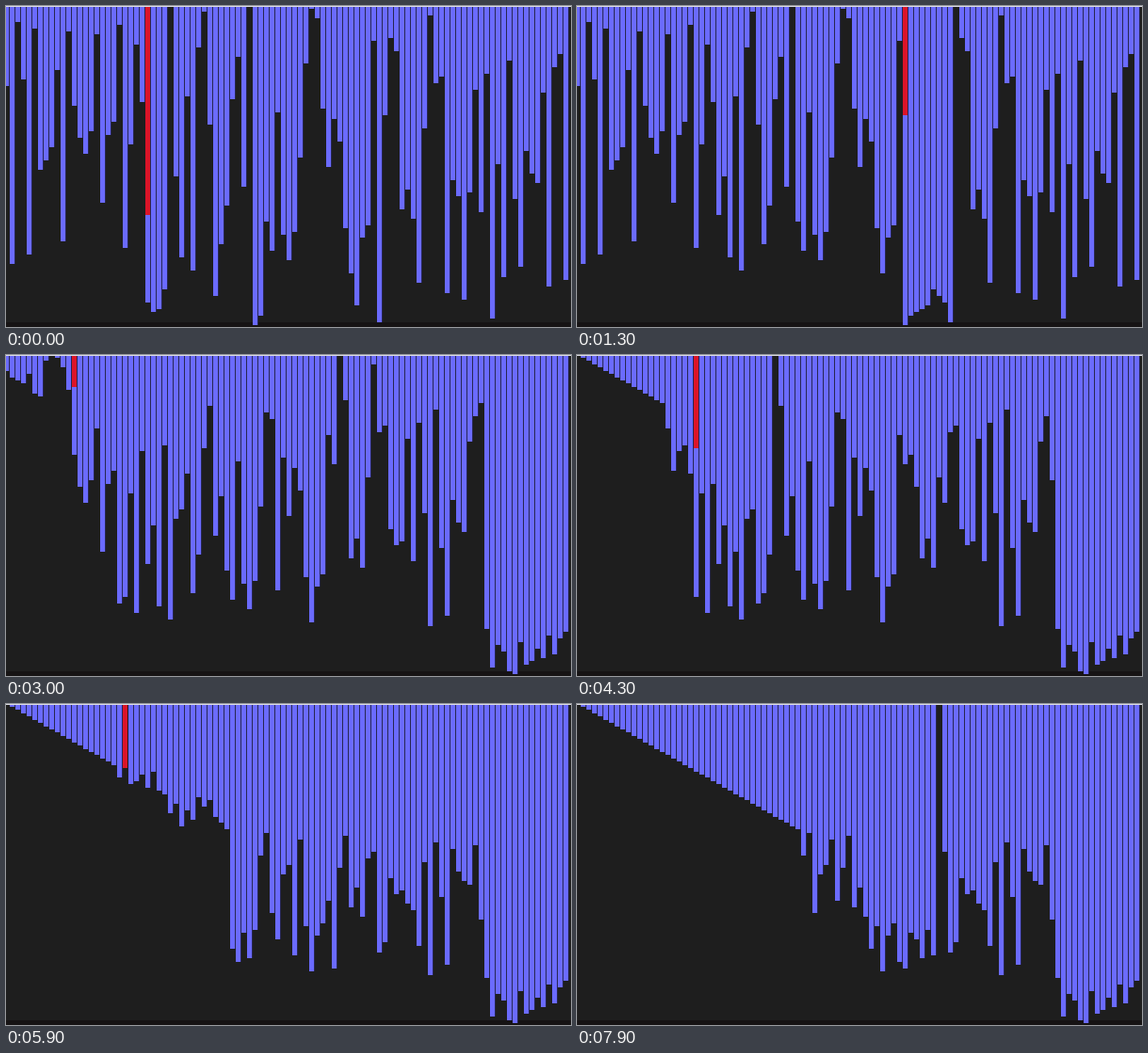
Write a matplotlib script that moves like this. It is 600 px wide and 341 px high and loops after 8 s.

```python
import numpy as np
import matplotlib.pyplot as plt
from matplotlib.animation import FuncAnimation
from matplotlib.patches import Rectangle

W, H, DPI = 600, 341, 64
FRAMES, INTERVAL = 80, 100
BG, FLOOR, TOP = "#1e1e1e", "#161314", "#dcdce4"
BLUE, EDGE, RED = "#6b6bff", "#272752", "#dc1428"
PITCH = 6

START = [
    25, 80, 5, 23, 77, 7, 51, 48, 44, 20, 73, 8, 31, 41, 46, 39, 9, 61, 40, 36,
    6, 75, 43, 12, 30, 92, 95, 94, 88, 65, 53, 78, 28, 82, 13, 2, 37, 90, 74, 62,
    29, 16, 56, 0, 99, 96, 67, 76, 33, 71, 79, 70, 47, 18, 1, 4, 32, 50, 35, 42,
    69, 83, 93, 72, 68, 11, 98, 34, 10, 14, 63, 57, 66, 86, 38, 3, 24, 22, 89, 54,
    59, 91, 58, 26, 64, 21, 97, 49, 84, 17, 60, 81, 45, 52, 55, 27, 87, 19, 15, 85,
]
SETTLED = 25  # leading swaps already done when the loop opens

# Sorting pace: swaps completed at given times (in frames)
PACE_T = [0, 7, 9, 18, 19, 30, 36, 43, 54, 59, 63, 72, 79]
PACE_N = [0.5, 18.83, 24.2, 45.5, 47.83, 73.5, 84.5, 103.5, 126.5,
          138.5, 148.5, 171.5, 184.17]


def quicksort(a, lo, hi):
    """Lomuto quicksort; yields (array before swap, i, j) for every swap."""
    if lo >= hi:
        return
    i = lo
    for j in range(lo, hi + 1):
        if j == hi or a[j] < a[hi]:
            yield a.copy(), i, j
            a[i], a[j] = a[j], a[i]
            i += 1
    p = i - 1
    yield from quicksort(a, lo, p - 1)
    yield from quicksort(a, p + 1, hi)


def bottom(v):
    return np.maximum(np.round(3.43 * np.asarray(v) - 0.5), 0)


swaps = list(quicksort(START.copy(), 0, len(START) - 1))[SETTLED:]

fig = plt.figure(figsize=(W / DPI, H / DPI), dpi=DPI, facecolor=BG)
ax = fig.add_axes([0, 0, 1, 1])
ax.set_xlim(0, W)
ax.set_ylim(H, 0)
ax.axis("off")


def box(x, y, w, h, color, z):
    return ax.add_patch(Rectangle((x, y), w, h, fc=color, lw=0,
                                  antialiased=False, zorder=z))


box(0, 336, W, 5, FLOOR, 0)
box(0, 0, W, 1, TOP, 5)
xs = PITCH * np.arange(len(START)) - 2
edges = [box(x, 0, PITCH, 0, EDGE, 1) for x in xs]
bars = [box(x, 0, PITCH - 1, 0, BLUE, 2) for x in xs]
cursor = box(0, 0, PITCH - 1, 0, RED, 3)


def draw(n):
    pos = np.interp(n, PACE_T, PACE_N)
    k = int(pos)
    phase = int((pos - k) * 3)
    before, i, j = swaps[k]
    values = before.copy()
    cursor.set_height(0)
    if phase < 2:  # j is wiped, then i turns red with its new value
        values[j] = 0
        if phase == 1:
            cursor.set_x(xs[i])
            cursor.set_height(bottom(before[j]))
    else:  # j receives the old value of i
        values[i], values[j] = before[j], before[i]
        cursor.set_x(xs[j])
        cursor.set_height(bottom(before[i]))
    for bar, edge, h in zip(bars, edges, bottom(values)):
        bar.set_height(h)
        edge.set_height(h)
    return [*edges, *bars, cursor]


anim = FuncAnimation(fig, draw, frames=FRAMES, interval=INTERVAL,
                     repeat=True, repeat_delay=0, blit=False)
plt.show()
```
